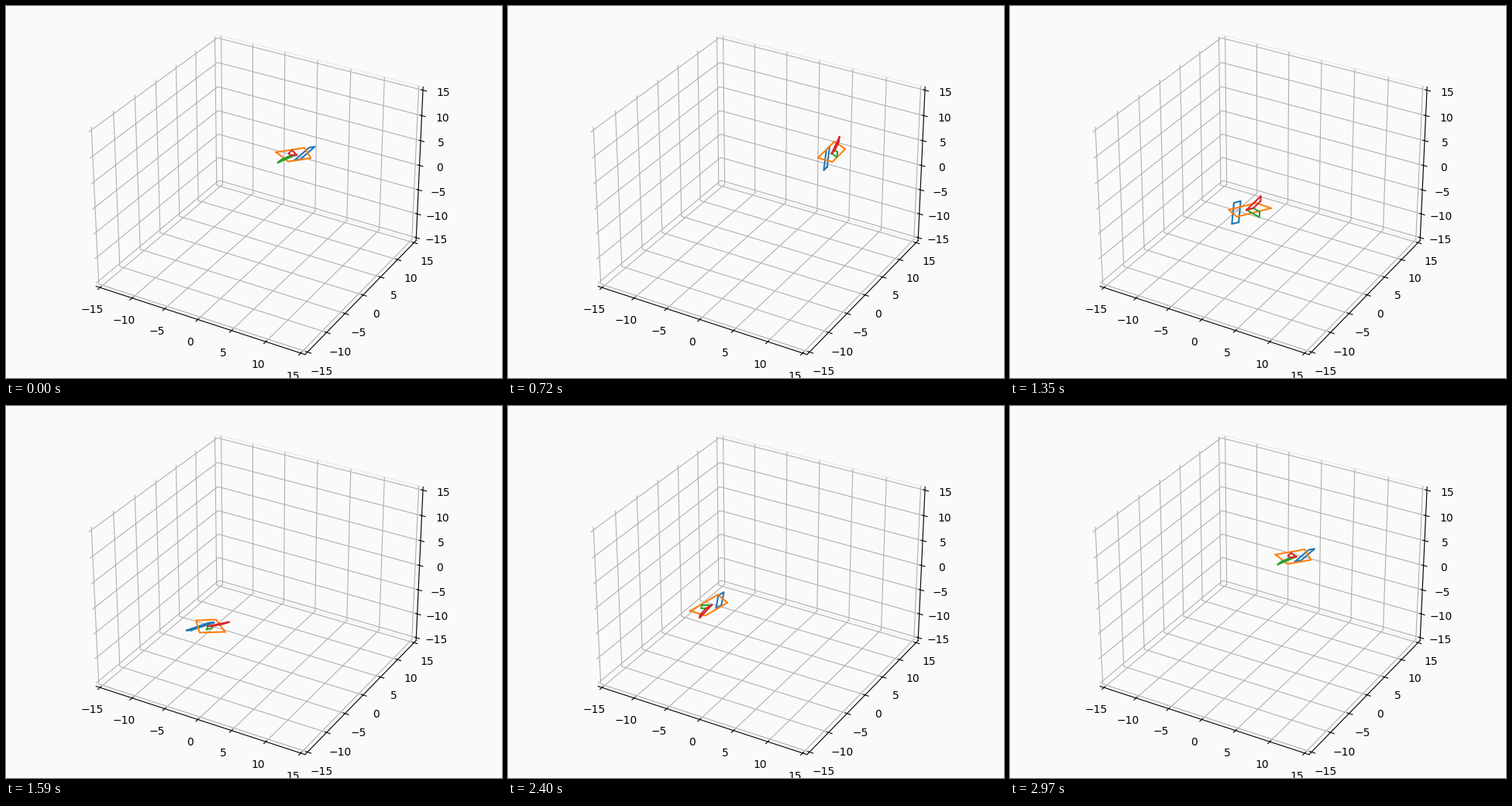
Animation, 640 px wide and 480 px high, one loop 3 s. Source, as a matplotlib script:

```python
import numpy as np
import matplotlib.pyplot as plt
from matplotlib.animation import FuncAnimation

FRAMES = 100
INTERVAL = 30
RADIUS = 10
LIMIT = 15
MAX_PITCH = np.pi / 6
PAPER = "#fafafa"

# Closed outlines in body axes: x forward, y left, z up
TAIL = [(0, 0, 0), (-2, -2, 0), (-2, -1, 0), (-1, 0, 0)]
PARTS = [
    ("C0", [(1, -2, 0), (2, -2, 0), (2, 2, 0), (1, 2, 0)]),
    ("C1", [(-3, 0, 1), (2, 0, 1), (2, 0, -1), (-2, 0, -1)]),
    ("C2", TAIL),
    ("C3", [(x, -y, z) for x, y, z in TAIL]),
]


def closed(points):
    return np.array(points + points[:1], dtype=float).T


def attitude(yaw, pitch, roll):
    """Columns are the forward, left and up directions."""
    cy, sy = np.cos(yaw), np.sin(yaw)
    cp, sp = np.cos(pitch), np.sin(pitch)
    cr, sr = np.cos(roll), np.sin(roll)
    forward = np.array([cp * cy, cp * sy, sp])
    left = np.array([-sy, cy, 0])
    up = np.array([-sp * cy, -sp * sy, cp])
    return np.column_stack([forward, cr * left + sr * up, cr * up - sr * left])


fig = plt.figure(figsize=(6.4, 4.8), dpi=100, facecolor=PAPER)
ax = fig.add_axes([0, 0, 1, 1], projection="3d", facecolor=PAPER)

shapes = [closed(points) for _, points in PARTS]
lines = [ax.plot(*shape, color=color)[0]
         for (color, _), shape in zip(PARTS, shapes)]

edge = LIMIT * 25 / 24
ax.set(xlim=(-edge, edge), ylim=(-edge, edge), zlim=(-edge, edge))
for axis, rim in ((ax.xaxis, PAPER), (ax.yaxis, "#ececec"), (ax.zaxis, "#f4f4f4")):
    axis.set_ticks(np.arange(-LIMIT, LIMIT + 1, 5))
    axis.set_pane_color(PAPER)
    axis.pane.set_edgecolor(rim)


def update(i):
    t = 2 * np.pi * i / FRAMES
    centre = RADIUS * np.array([[np.sin(t)], [np.cos(t)], [np.sin(t)]])
    turn = attitude(-t, MAX_PITCH * np.cos(t), t)
    for line, shape in zip(lines, shapes):
        line.set_data_3d(*(turn @ shape + centre))
    return lines


anim = FuncAnimation(fig, update, frames=FRAMES, interval=INTERVAL,
                     repeat=True, repeat_delay=0)
plt.show()
```
